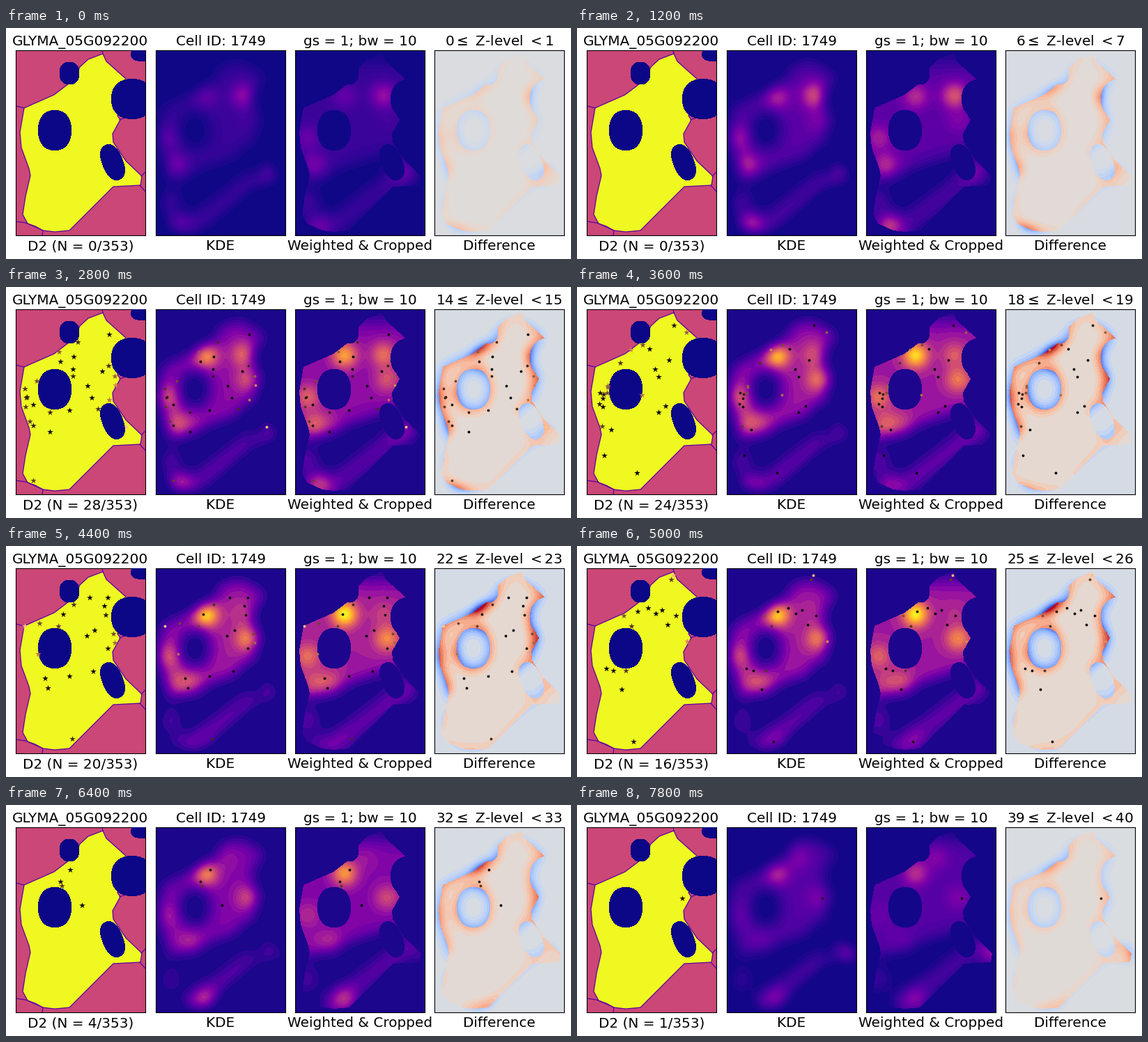
A matplotlib script for the animation above (8 s loop, 811 by 332 pixels).

```python
import numpy as np
import matplotlib.pyplot as plt
from matplotlib.animation import FuncAnimation
from matplotlib.path import Path
from matplotlib.ticker import MaxNLocator

WIDTH, HEIGHT, DPI = 811, 332, 100
LEFT, TOP, COLS, ROWS = 14, 32, 186, 266
EXTENT = (LEFT, LEFT + COLS, TOP + ROWS, TOP)
LEVELS, TOTAL = 40, 353
BANDWIDTH, SPOT_SIZE = 10, 13

plt.rcParams["font.family"] = "DejaVu Sans"
plasma = plt.get_cmap("plasma")
copper = plt.get_cmap("copper")

CELL = [(139, 37), (144, 48), (172, 73), (175, 100), (160, 126), (164, 132),
        (153, 152), (154, 164), (172, 191), (195, 213), (193, 226), (154, 228),
        (122, 260), (91, 291), (70, 293), (53, 291), (31, 281), (24, 268),
        (28, 242), (35, 212), (33, 202), (22, 172), (20, 150), (26, 115),
        (69, 96), (98, 74), (106, 56), (118, 45)]
WALLS = [[(14, 112), (26, 115)],
         [(138, 32), (139, 37)],
         [(163, 132), (174, 128)],
         [(194, 213), (201, 206)],
         [(192, 226), (201, 236)],
         [(14, 278), (28, 280), (42, 285), (53, 291), (52, 299)]]
# Organelles: centre x, y, radii, tilt in degrees
BLOBS = [(70, 147, 24, 29, 0), (91, 65, 14.5, 16.5, 0), (181, 102, 30, 29, 0),
         (195, 38, 16, 10, 0), (153, 193, 15, 27, -22)]
# Hotspots: x, y, peak, level of the peak, spread over levels
HOTSPOTS = [(85, 98, .65, 23, 17), (141, 97, .40, 9, 12), (32, 158, .30, 17, 17),
            (42, 197, .28, 12, 15), (146, 133, .37, 23, 14), (65, 197, .20, 25, 12),
            (47, 285, .48, 10, 10), (30, 250, .14, 18, 25), (168, 208, .12, 5, 15),
            (85, 280, .28, 33, 8), (196, 212, .28, 40, 7), (115, 75, .12, 38, 8)]


def bell(d, width):
    return np.exp(-(d / width) ** 2)


def sigmoid(d, width):
    return 1 / (1 + np.exp(-d / width))


def superellipse(cx, cy, rx, ry, tilt, power=2.3):
    t = np.linspace(0, 2 * np.pi, 80)
    c, s = np.cos(t), np.sin(t)
    x = rx * np.sign(c) * np.abs(c) ** (2 / power)
    y = ry * np.sign(s) * np.abs(s) ** (2 / power)
    a = np.radians(tilt)
    return np.stack([cx + x * np.cos(a) - y * np.sin(a),
                     cy + x * np.sin(a) + y * np.cos(a)], 1)


def inside(outline):
    return Path(outline).contains_points(grid).reshape(ROWS, COLS)


def blur_matrix(n):
    i = np.arange(n)
    g = np.exp(-(i[:, None] - i) ** 2 / (2 * BANDWIDTH ** 2))
    return g / (BANDWIDTH * np.sqrt(2 * np.pi))


def segment_distance(a, b):
    a, d = np.array(a), np.subtract(b, a)
    t = np.clip(((X - a[0]) * d[0] + (Y - a[1]) * d[1]) / (d @ d), 0, 1)
    return np.hypot(X - a[0] - t * d[0], Y - a[1] - t * d[1])


X, Y = np.meshgrid(LEFT + .5 + np.arange(COLS), TOP + .5 + np.arange(ROWS))
grid = np.stack([X, Y], -1).reshape(-1, 2)

cell = inside(CELL)
blobs = np.any([inside(superellipse(*b)) for b in BLOBS], axis=0)
mask = cell & ~blobs
coverage = blur_matrix(ROWS) @ mask @ blur_matrix(COLS)

# Smooth density: upper body, strip along the lower edge, hotspots
body = sigmoid(226 - Y - .33 * X, 6) * sigmoid(Y - 50, 8)
strip = bell(segment_distance((172, 206), (70, 284)), 17)
bumps = [bell(np.hypot(X - x, Y - y), SPOT_SIZE * 2 ** .5)
         for x, y, *_ in HOTSPOTS]


def fields(z):
    density = .35 * bell(z - 22, 18) * body + .17 * bell(z - 22, 24) * strip
    for bump, (_, _, peak, mid, spread) in zip(bumps, HOTSPOTS):
        density = density + peak * bell(z - mid, spread) * bump
    kde, weighted = density * coverage, density * mask
    return kde, weighted, weighted - kde


def banded(f):
    ticks = MaxNLocator(21, min_n_ticks=1).tick_values(f.min(), f.max())
    step = ticks[1] - ticks[0]
    return (np.floor(f / step) + .5) * step


def spots(z, weighted):
    n = round(np.interp(z, [12, 14, 22, 28, 32, 39], [0, 28, 20, 12, 4, 1]))
    rng = np.random.default_rng(z)
    p = weighted.ravel() ** 1.5
    return grid[rng.choice(p.size, n, p=p / p.sum())]


def spot_colors(pts):
    col, row = (pts - (LEFT, TOP)).astype(int).T
    return copper(np.clip(.85 * (1 / coverage[row, col] - 1.12), 0, 1))


def panel(left, title, label):
    ax = fig.add_axes([left / WIDTH, 1 - (TOP + ROWS) / HEIGHT,
                       COLS / WIDTH, ROWS / HEIGHT])
    ax.set(xticks=[], yticks=[])
    ax.set_title(title, fontsize=14.4, pad=5)
    ax.set_xlabel(label, fontsize=14.4, labelpad=4.4)
    return ax


def show(ax, data, cmap, lo, hi):
    return ax.imshow(data, cmap=cmap, vmin=lo, vmax=hi, extent=EXTENT,
                     interpolation="nearest", aspect="auto")


fig = plt.figure(figsize=(WIDTH / DPI, HEIGHT / DPI), dpi=DPI, facecolor="white")
axes = [panel(14, "GLYMA_05G092200", ""),
        panel(215, "Cell ID: 1749", "KDE"),
        panel(415, "gs = 1; bw = 10", "Weighted & Cropped"),
        panel(615, "", "Difference")]

show(axes[0], 1 + cell, "plasma", 0, 2)
for wall in WALLS + [CELL + CELL[:1]]:
    axes[0].plot(*np.array(wall).T, color=plasma(.16), lw=.9, zorder=2)
show(axes[0], np.ma.masked_where(~blobs, np.zeros(blobs.shape)),
     "plasma", 0, 2).set_zorder(3)

blank = np.zeros((ROWS, COLS))
images = [show(axes[1], blank, "plasma", 0, 1),
          show(axes[2], blank, "plasma", 0, 1),
          show(axes[3], blank, "coolwarm", -.35, .35)]
dots = [ax.scatter([], [], s=s, marker=m, linewidths=0, zorder=4)
        for ax, s, m in zip(axes, (42, 30, 30, 30), "*...")]
for ax in axes:
    ax.set(xlim=EXTENT[:2], ylim=EXTENT[2:])


def draw(z):
    data = fields(z)
    for image, field in zip(images, data):
        image.set_data(banded(field))
    pts = spots(z, data[1])
    for d in dots:
        d.set_offsets(pts)
        d.set_facecolor(spot_colors(pts))
    axes[0].set_xlabel(f"D2 (N = {len(pts)}/{TOTAL})")
    axes[3].set_title(rf"{z}$\leq$ Z-level $<${z + 1}", fontsize=14.4, pad=5)
    return images + dots


anim = FuncAnimation(fig, draw, frames=LEVELS, interval=200,
                     init_func=lambda: draw(0), repeat=True, repeat_delay=0)
plt.show()
```
